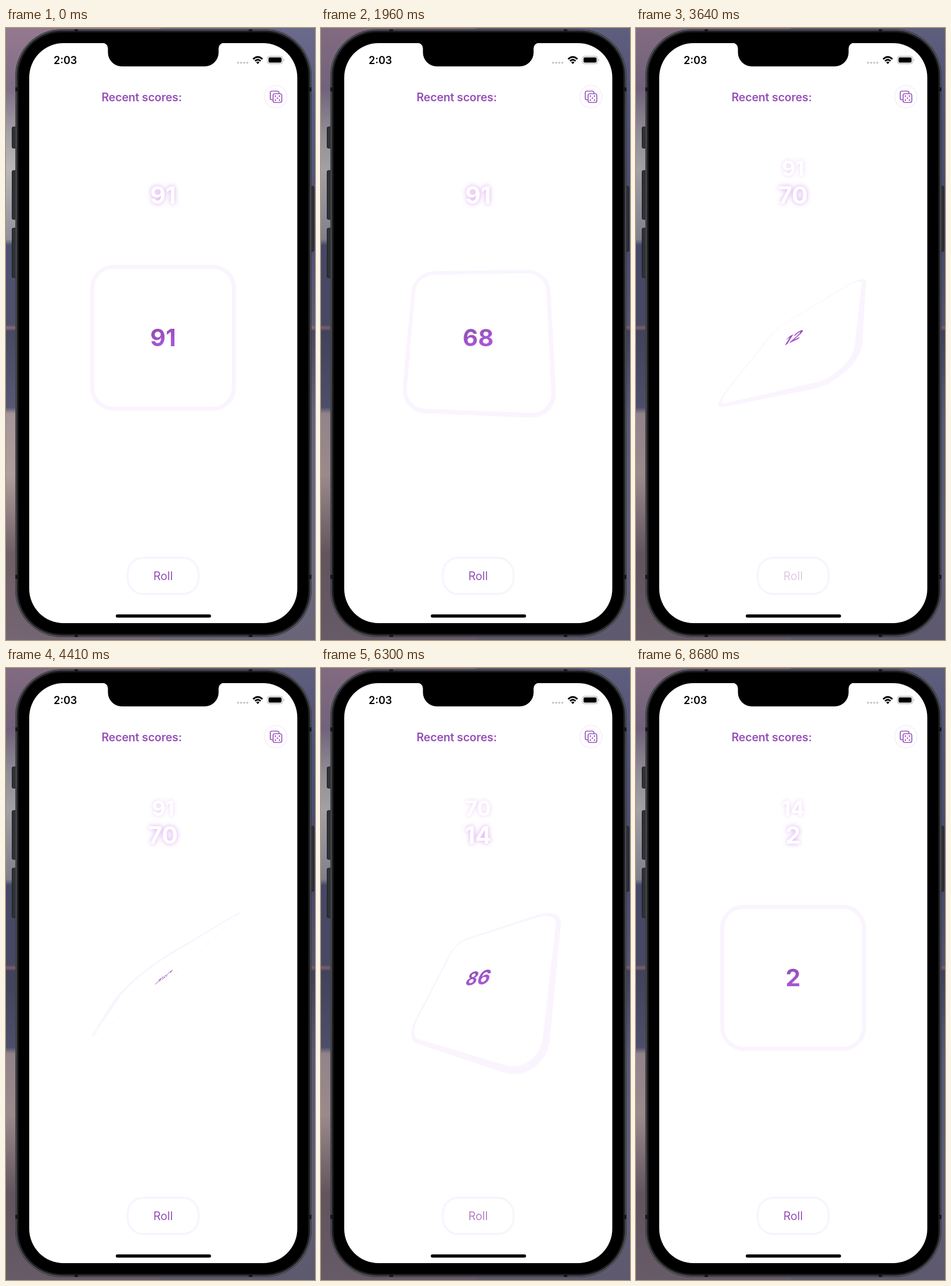
Animation of 532 by 1052 pixels, one loop 8.82 s. Source, as an HTML page:

```html
<!DOCTYPE html>
<html lang="en">
<head>
<meta charset="utf-8">
<title>Dice roll</title>
<style>
  html, body { margin: 0; width: 100%; height: 100%; overflow: hidden; background: #fff; }
  svg { position: absolute; left: 0; top: 0; display: block; }
  text, #card { font-family: Inter, Roboto, sans-serif; }
  #card {
    position: absolute; left: 145px; top: 406.5px; width: 251px; height: 251px;
    box-sizing: border-box; border: 7px solid #faf4fe; border-radius: 40px;
    font-size: 41px; font-weight: 700; line-height: 237px; text-align: center;
  }
  #num {
    background: linear-gradient(160deg, #9450ba 30%, #a956d2 70%);
    -webkit-background-clip: text; background-clip: text; color: transparent;
  }
  #scores text { font-size: 41px; font-weight: 700; fill: #fff; text-anchor: middle; }
</style>
</head>
<body>
<svg width="532" height="1052" viewBox="0 0 532 1052">
  <defs>
    <linearGradient id="left" x2="0" y2="1">
      <stop offset="0" stop-color="#94798f"/>
      <stop offset=".1" stop-color="#806f88"/>
      <stop offset=".17" stop-color="#a3a0a6"/>
      <stop offset=".23" stop-color="#b9b7b8"/>
      <stop offset=".345" stop-color="#92919c"/>
      <stop offset=".355" stop-color="#4c5072"/>
      <stop offset=".485" stop-color="#50506c"/>
      <stop offset=".49" stop-color="#8c6a76"/>
      <stop offset=".495" stop-color="#484a62"/>
      <stop offset=".62" stop-color="#565874"/>
      <stop offset=".63" stop-color="#a5959a"/>
      <stop offset=".73" stop-color="#b09d9c"/>
      <stop offset=".86" stop-color="#6e5e66"/>
      <stop offset="1" stop-color="#746672"/>
    </linearGradient>
    <linearGradient id="right" x2="0" y2="1">
      <stop offset="0" stop-color="#6c6a8a"/>
      <stop offset=".12" stop-color="#555b84"/>
      <stop offset=".35" stop-color="#4c5178"/>
      <stop offset=".485" stop-color="#5e5c7a"/>
      <stop offset=".49" stop-color="#8c6a76"/>
      <stop offset=".495" stop-color="#444866"/>
      <stop offset=".63" stop-color="#606382"/>
      <stop offset=".85" stop-color="#686884"/>
      <stop offset="1" stop-color="#6a6478"/>
    </linearGradient>
    <clipPath id="window"><rect x="180" y="170" width="182" height="141"/></clipPath>
  </defs>

  <rect width="270" height="1052" fill="url(#left)"/>
  <rect x="266" width="266" height="1052" fill="url(#right)"/>
  <rect id="shade" width="532" height="1052" fill="#181a30"/>

  <g fill="#303135" stroke="#1b1c1f">
    <rect x="10.5" y="170" width="8" height="36.5" rx="2"/>
    <rect x="10.5" y="245" width="8" height="84" rx="2"/>
    <rect x="10.5" y="344" width="8" height="85" rx="2"/>
    <rect x="523" y="272" width="7" height="112" rx="2"/>
  </g>
  <rect x="16" y="2" width="510" height="1045" rx="80" fill="#1e1f22"/>
  <rect x="17.5" y="3.5" width="507" height="1042" rx="78.5" fill="none" stroke="#515256" stroke-width="2"/>
  <rect x="21.5" y="7.5" width="499" height="1034" rx="74" fill="#000"/>
  <g fill="#151618">
    <rect x="118" y="2" width="6" height="5"/><rect x="418" y="1042" width="6" height="5"/>
    <rect x="118" y="1042" width="6" height="5"/><rect x="418" y="2" width="6" height="5"/>
    <rect x="16" y="102" width="5" height="7"/><rect x="521" y="102" width="5" height="7"/>
    <rect x="16" y="940" width="5" height="7"/><rect x="521" y="940" width="5" height="7"/>
  </g>
  <rect x="40" y="26" width="461.5" height="997" rx="59" fill="#fff"/>
  <path d="M166 25.5A9.500 9.500 0 0 1 175.500 35V42A24 24 0 0 0 199.500 66H342A24 24 0 0 0 366 42V35A9.500 9.500 0 0 1 375.500 25.500Z"/>

  <text x="82" y="62" font-size="18" font-weight="600">2:03</text>
  <g fill="#c4c4c6">
    <circle cx="399.500" cy="59.800" r="1.800"/><circle cx="404.800" cy="59.800" r="1.800"/>
    <circle cx="410.100" cy="59.800" r="1.800"/><circle cx="415.400" cy="59.800" r="1.800"/>
  </g>
  <g fill="none" stroke="#000" stroke-width="2.800">
    <path d="M425.500 53.500Q433.500 45.800 441.500 53.500"/>
    <path d="M428.700 56.800Q433.500 52.200 438.300 56.800"/>
  </g>
  <path d="M430.700 59Q433.500 56.600 436.300 59L433.500 62Z"/>
  <rect x="450" y="48.500" width="26.500" height="13" rx="4" fill="none" stroke="#aaa"/>
  <rect x="452" y="50.500" width="22.500" height="9" rx="2.300"/>
  <path d="M478 53Q480 55 478 57Z" fill="#aaa"/>

  <text x="164.500" y="125.500" font-size="19.500" font-weight="600" letter-spacing="-.15" fill="#9650b8">Recent scores:</text>
  <circle cx="464.500" cy="118" r="19.300" fill="#fff" stroke="#f8f1fd" stroke-width="2"/>
  <g fill="#fff" stroke="#9c5abd" stroke-width="1.700">
    <rect x="455" y="108.500" width="15" height="15" rx="3"/>
    <rect x="459.800" y="113" width="15" height="15" rx="3"/>
  </g>
  <g fill="#9650b8">
    <circle cx="463.800" cy="117" r="1.300"/><circle cx="470.800" cy="117" r="1.300"/>
    <circle cx="467.300" cy="120.500" r="1.300"/>
    <circle cx="463.800" cy="124" r="1.300"/><circle cx="470.800" cy="124" r="1.300"/>
  </g>

  <g id="scores" clip-path="url(#window)"></g>

  <rect x="209.500" y="910.500" width="122" height="62.500" rx="27" fill="#fff" stroke="#faf3fe" stroke-width="3.500"/>
  <text id="roll" x="270.500" y="949" font-size="19.500" text-anchor="middle" fill="#9450b5">Roll</text>
  <rect x="189" y="1008" width="164" height="5.500" rx="2.750"/>
</svg>
<div id="card"><span id="num">91</span></div>

<script>
const LOOP = 8820, STEP = 70, TURN = 1440, SLIDE = 600, ROW = 47;
const values = [91, 70, 14, 2];

// One entry per tap: spin timing, axis at start and end, number shown while rolling.
const rolls = [
  { start: 900, end: 3500, power: 2.7, from: [.92, -.36, .09], to: [.92, -.36, .09], temp: 68, land: 2500, release: 880 },
  { start: 3597, end: 6225, power: 3.17, from: [.77, -.635, 0], to: [.77, -.635, 0], temp: 12, land: 5180, release: 3625 },
  { start: 6249, end: 8190, power: 1.417, from: [.65, -.75, .12], to: [.5, -.53, .86], temp: 86, land: 7590, release: 6175 }
];

const $ = id => document.getElementById(id);
const clamp = v => Math.max(0, Math.min(1, v));
const easeOut = (p, power) => 1 - Math.pow(1 - clamp(p), power);

const labels = values.map(v => {
  const el = document.createElementNS('http://www.w3.org/2000/svg', 'text');
  el.textContent = v;
  el.setAttribute('y', 14.9);
  $('scores').append(el);
  return el;
});

function drawCard(t) {
  let transform = 'none', shown = values[0];
  rolls.forEach((r, i) => {
    if (t < r.start) return;
    shown = t < r.land ? r.temp : values[i + 1];
    const p = clamp((t - r.start) / (r.end - r.start));
    const axis = r.from.map((a, k) => a + (r.to[k] - a) * p);
    transform = p < 1
      ? `perspective(278px) rotate3d(${axis}, ${TURN * easeOut(p, r.power)}deg)`
      : 'none';
  });
  $('card').style.transform = transform;
  $('num').textContent = shown;
}

function drawScores(t) {
  const shift = rolls.reduce((sum, r) => sum + easeOut((t - r.land) / SLIDE, 2), 0);
  labels.forEach((el, i) => {
    const row = i - shift;
    const y = 287.5 + row * ROW;
    const scale = row > 0 ? 1 : 1.36 - .018 * Math.abs(y - 267.5);
    const visible = row < 1 && scale > .15;
    el.style.display = visible ? '' : 'none';
    if (!visible) return;
    const glow = .6 - .28 * clamp(-row);
    el.setAttribute('transform', `translate(270.5 ${y}) scale(${scale})`);
    el.style.filter = `drop-shadow(0 0 4.5px rgba(190,104,226,${glow}))`;
  });
}

function rollOpacity(t) {
  return rolls.reduce((low, r) => {
    const press = clamp((t - r.release + 130) / 60);
    const lift = clamp((t - r.release) / 200);
    return Math.min(low, 1 - .75 * press * (1 - lift));
  }, 1);
}

function draw(t) {
  drawCard(t);
  drawScores(t);
  $('roll').style.opacity = rollOpacity(t);
  $('shade').style.opacity = t < 840 ? 0 : .14;
}

const origin = performance.now();
function tick() {
  const t = (performance.now() - origin) % LOOP;
  draw(t - t % STEP);
  requestAnimationFrame(tick);
}
tick();
</script>
</body>
</html>
```
